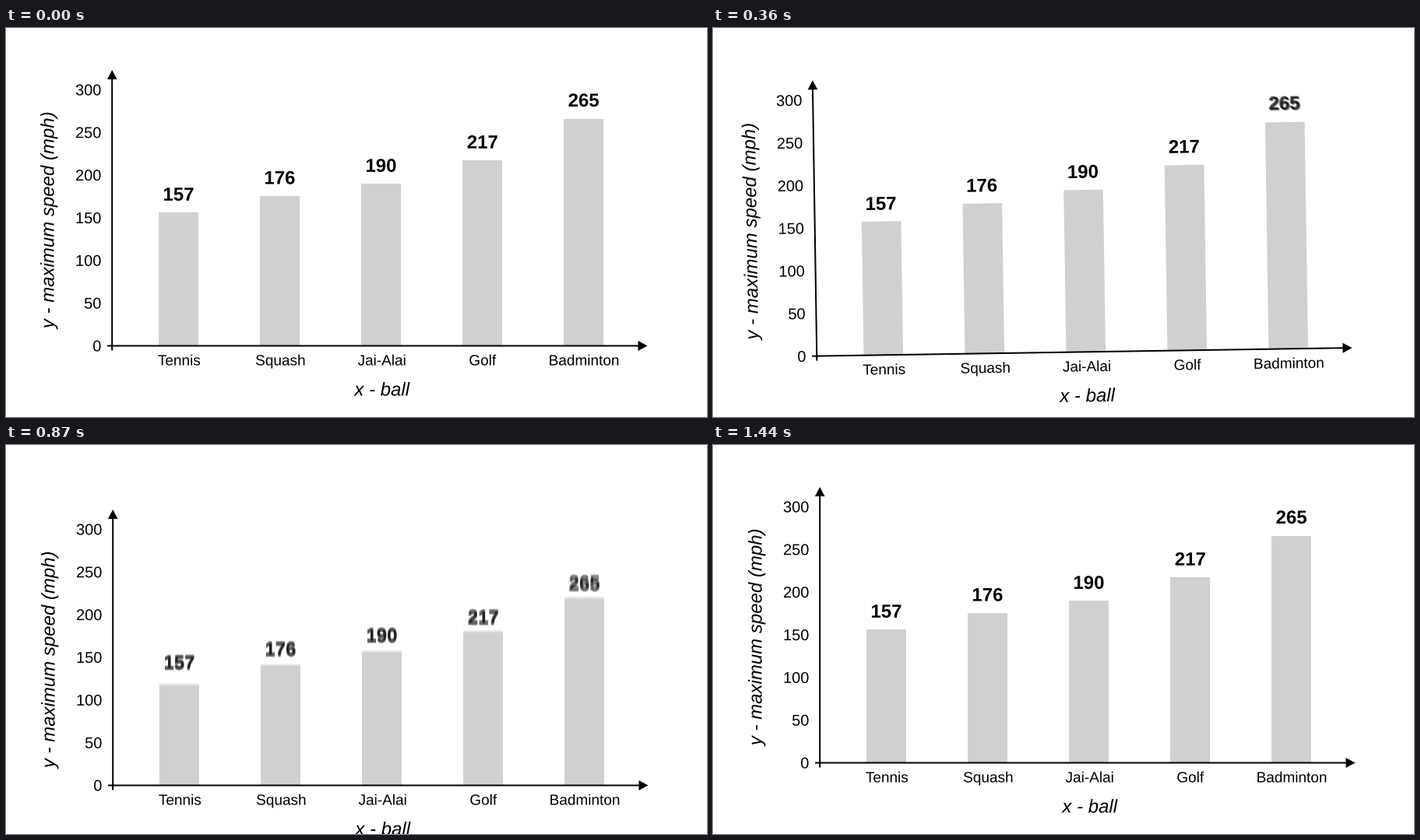
A matplotlib script that plays this animation: 900x500 px, repeating every 3.63 s.

```python
import numpy as np
import matplotlib.pyplot as plt
from matplotlib.animation import FuncAnimation
from matplotlib.collections import PolyCollection
from matplotlib.patches import PathPatch
from matplotlib.path import Path
from matplotlib.textpath import TextPath
from matplotlib.transforms import Affine2D

W, H = 900, 500
STEP, FRAMES = 30, 121
SHUTTER = 20                     # ms of motion blur
GHOSTS = 9
BASE = 408.5                     # y of the x axis
PIVOT = (340, 600)
GREY = np.array([208, 208, 210]) / 255

NAMES = ["Tennis", "Squash", "Jai-Alai", "Golf", "Badminton"]
SPEEDS = np.array([157, 176, 190, 217, 265])
CENTERS = 221.7 + 130 * np.arange(5)
TOPS = 410.5 - SPEEDS * 1.107
LABEL_BASELINES = 397.5 - SPEEDS * 1.119
BAR_SINK = np.array([42, 38, 36, 40, 50])
LABEL_SINK = np.array([37, 41, 39, 46, 56])

# (time in ms, value)
TILT = [(15, 0), (210, .028), (400, -.021), (500, -.021), (650, 0),
        (930, 0), (1110, -.012), (1290, .006), (1440, 0)]
DROP = [(0, 0), (120, 8.3), (360, 10), (600, 12.8), (870, 29), (930, 29),
        (1110, -62), (1290, 0), (1360, -3), (1440, 0)]
SINK = [(690, 0), (930, 1.185), (990, 0), (1245, 0), (1290, .25), (1420, 0)]
FLY = [(930, 0), (960, -60), (1050, -592), (1125, -592), (1245, 0)]


def ease(t, keys):
    """Smoothstep between neighbouring keys."""
    if t <= keys[0][0]:
        return keys[0][1]
    for (t0, a), (t1, b) in zip(keys, keys[1:]):
        if t < t1:
            u = (t - t0) / (t1 - t0)
            return a + (b - a) * u * u * (3 - 2 * u)
    return keys[-1][1]


def fly(t):
    times, values = zip(*FLY)
    return np.interp(t, times, values)


def motion(t):
    shift = 1 if t >= 690 else 0
    return (Affine2D().translate(-PIVOT[0], -PIVOT[1])
            .rotate(ease(t, TILT))
            .translate(PIVOT[0] + shift, PIVOT[1] + ease(t, DROP)))


def bar_offset(t):
    return BAR_SINK * ease(t, SINK) + fly(t)


def label_offset(t):
    return LABEL_SINK * ease(t, SINK) + 1.25 * fly(t)


def polygon(*points):
    return Path(list(points) + [points[0]], closed=True)


def rect(x0, y0, x1, y1):
    return polygon((x0, y0), (x1, y0), (x1, y1), (x0, y1))


def text(s, x, y, size, align=.5, angle=0, **font):
    """Outline of s on baseline y; align 0, .5 or 1 places it at x."""
    path = TextPath((0, 0), s, size=size,
                    prop=dict(family="Liberation Sans", **font))
    box = path.get_extents()
    left = box.x0 + align * box.width
    return path.transformed(Affine2D().translate(-left, 0).scale(1, -1)
                            .rotate_deg(angle).translate(x, y))


def chart_path():
    parts = [
        rect(130, 407.5, 811.5, 409.5),
        rect(135.2, 66, 137.2, 414.5),
        polygon((811.5, 402), (823.5, 408.5), (811.5, 415)),
        polygon((129.9, 66), (136.2, 54), (142.5, 66)),
        text("x - ball", 482.5, 472.5, 24, style="italic"),
        text("y - maximum speed (mph)", 61.5, 387.5, 24, align=0, angle=-90,
             style="italic"),
    ]
    for v in range(0, 301, 50):
        parts.append(text(str(v), 121.6, BASE + 7 - v * 1.097, 20, align=1))
    for name, x in zip(NAMES, CENTERS):
        parts.append(text(name, x + .5, 433.5, 19))
    return Path.make_compound_path(*parts)


fig = plt.figure(figsize=(W / 100, H / 100), dpi=100, facecolor="white")
ax = fig.add_axes([0, 0, 1, 1])
ax.set_xlim(0, W)
ax.set_ylim(H, 0)
ax.axis("off")


def ghosts(path, zorder):
    copies = [PathPatch(path, facecolor="black", linewidth=0, zorder=zorder)
              for _ in range(GHOSTS)]
    for patch in copies:
        ax.add_patch(patch)
    return copies


bars = PolyCollection([], edgecolors="none", zorder=1)
ax.add_collection(bars, autolim=False)
chart = ghosts(chart_path(), 2)
labels = [ghosts(text(str(v), x, y, 24, weight="bold"), 3)
          for v, x, y in zip(SPEEDS, CENTERS, LABEL_BASELINES)]


def smear(copies, t, place, probes):
    """Spread copies over the shutter time; one solid copy when slow."""
    start, end = (place(t + s).transform(probes)
                  for s in (-SHUTTER / 2, SHUTTER / 2))
    length = np.hypot(*(end - start).T).max()
    sharp = length < 3
    for k, patch in enumerate(copies):
        patch.set_visible(k == 0 or not sharp)
        moment = t if sharp else t + SHUTTER * (k / (GHOSTS - 1) - .5)
        patch.set_transform(place(moment) + ax.transData)
        patch.set_alpha(1 if sharp else min(.2, .06 + .8 / length))


def draw_bars(t):
    before, after = (bar_offset(t + s) + ease(t + s, DROP)
                     for s in (-SHUTTER / 2, SHUTTER / 2))
    verts, colors = [], []
    for x, top, off, blur in zip(CENTERS, TOPS, bar_offset(t),
                                 abs(after - before)):
        if abs(off) < .5 or blur < 1.5:
            blur = 0
        # nested boxes, each a little darker, form the blurred ends
        for level in (np.arange(1, 25) / 24 if blur else [1]):
            inset = blur * (level - .5)
            y0 = top + off + inset
            y1 = min(BASE + off - inset, BASE)
            verts.append([(x - 25.3, y0), (x + 25.3, y0),
                          (x + 25.3, y1), (x - 25.3, y1)])
            colors.append(1 - level * (1 - GREY))
    bars.set_verts(verts)
    bars.set_facecolor(colors)
    bars.set_transform(motion(t) + ax.transData)


def update(frame):
    t = frame * STEP
    draw_bars(t)
    smear(chart, t, motion, [(136, 55), (824, 408)])
    for i, copies in enumerate(labels):
        def place(moment, i=i):
            lift = Affine2D().translate(0, label_offset(moment)[i])
            return lift + motion(moment)
        smear(copies, t, place, [(CENTERS[i], LABEL_BASELINES[i] - 8)])
    return [bars]


anim = FuncAnimation(fig, update, frames=FRAMES, interval=STEP,
                     init_func=lambda: update(0), repeat=True,
                     repeat_delay=0, blit=False)
plt.show()
```
